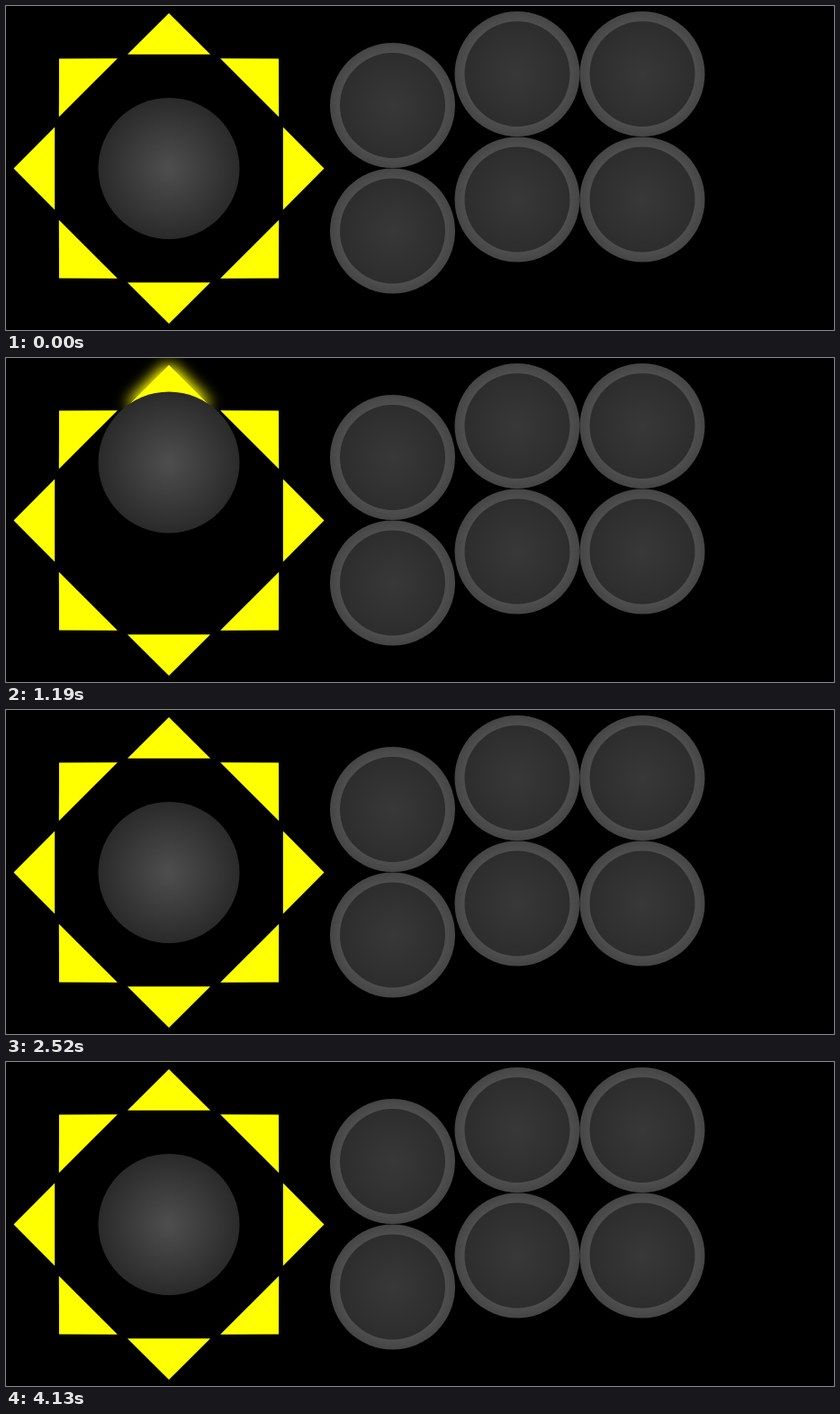
An HTML page with a canvas for the animation above (4200 ms loop, 920 by 360 pixels).

```html
<!DOCTYPE html>
<html lang="en">
<head>
<meta charset="utf-8">
<title>Arcade stick</title>
<style>
  html, body { margin: 0; width: 100%; height: 100%; overflow: hidden; background: #000; }
  canvas { display: block; }
</style>
</head>
<body>
<canvas id="stage" width="920" height="360"></canvas>
<script>
const ctx = document.getElementById('stage').getContext('2d');
const LOOP = 4200, STEP = 70;
const CX = 181, CY = 180.5, REACH = 64.5;
const SPIN_START = 560, SPIN_END = 1190, EASE_TIME = 140;
const BUTTONS = [
  [429.5, 110.5], [568, 75.5], [707, 75.5],
  [429.5, 250], [568, 215], [707, 215]
];

function disc(x, y, r, inner, outer) {
  const fill = ctx.createRadialGradient(x, y, 0, x, y, r);
  fill.addColorStop(0, inner);
  fill.addColorStop(1, outer);
  ctx.fillStyle = fill;
  ctx.beginPath();
  ctx.arc(x, y, r, 0, Math.PI * 2);
  ctx.fill();
}

function arrow(index, lit) {
  ctx.save();
  ctx.translate(CX, CY);
  ctx.rotate(index * Math.PI / 4);
  ctx.fillStyle = '#ff0';
  ctx.beginPath();
  ctx.moveTo(172.5, 0);
  ctx.lineTo(126.8, -46);
  ctx.lineTo(126.8, 46);
  ctx.closePath();
  if (lit) {
    ctx.shadowColor = '#ff0';
    ctx.shadowBlur = 17;
    ctx.fill();
  }
  ctx.fill();
  ctx.restore();
}

// Stick rolls clockwise from right, through down and left, to up.
function stickAt(t) {
  const clamp = v => Math.min(1, Math.max(0, v));
  const turn = clamp((t - SPIN_START) / (SPIN_END - SPIN_START));
  const push = clamp((t - SPIN_START) / EASE_TIME + 1);
  const release = clamp((t - SPIN_END) / EASE_TIME);
  return { angle: turn * Math.PI * 1.5, tilt: push - release };
}

function draw(t) {
  const { angle, tilt } = stickAt(t);
  const active = tilt > 0.9 ? Math.round(angle / (Math.PI / 4)) : -1;
  ctx.fillStyle = '#000';
  ctx.fillRect(0, 0, 920, 360);
  for (let i = 0; i < 8; i++) arrow(i, i === active);
  disc(CX + Math.cos(angle) * REACH * tilt, CY + Math.sin(angle) * REACH * tilt,
    78.5, '#4e4e4e', '#2a2a2a');
  for (const [x, y] of BUTTONS) {
    disc(x, y, 69.5, '#808080', '#454545');
    disc(x, y, 58.5, '#383838', '#2d2d2d');
  }
}

const start = performance.now();
function tick() {
  const t = (performance.now() - start) % LOOP;
  draw(Math.floor(t / STEP) * STEP);
  requestAnimationFrame(tick);
}
tick();
</script>
</body>
</html>
```
